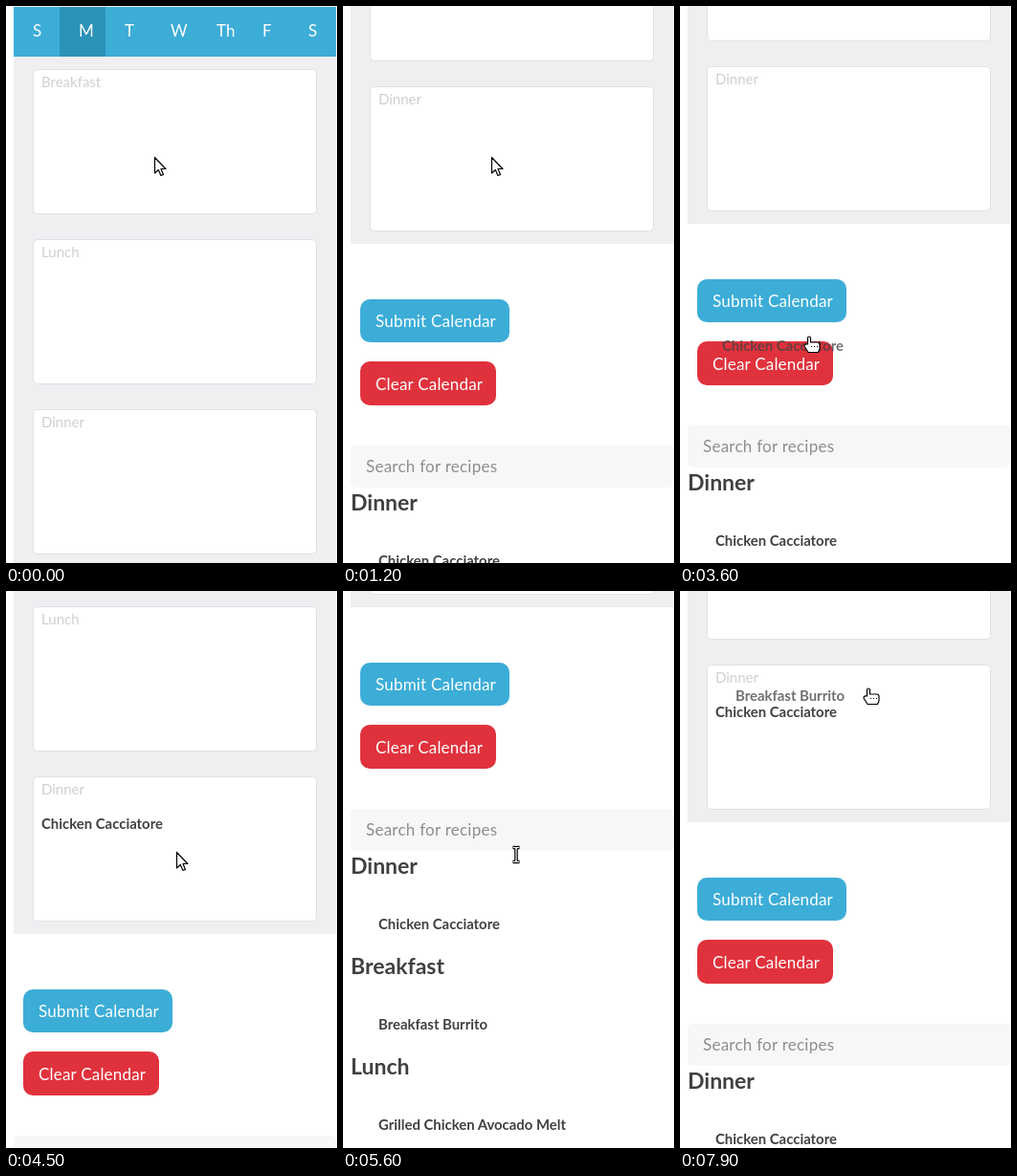
These frames come from a looping animation (346x583 px, 8000 ms). An HTML page:

```html
<!DOCTYPE html>
<html lang="en">
<head>
<meta charset="utf-8">
<title>Meal planner</title>
<style>
  html, body { margin: 0; width: 100%; height: 100%; overflow: hidden; background: #fff; }
  svg { display: block; }
  text { font-family: Lato, "Open Sans", sans-serif; }
  .day, .btn { font-size: 17px; letter-spacing: .2px; fill: #fff; }
  .search { font-size: 17px; letter-spacing: .25px; fill: #8e8e8e; }
  .meal { font-size: 15px; fill: #cdd0d3; }
  .title { font-size: 23px; font-weight: 700; fill: #404040; }
  .item { font-size: 14.9px; font-weight: 700; fill: #404040; }
  .ghost { opacity: .75; }
  .box { fill: #fff; stroke: #dfe1e4; }
  .cursor { fill: #fff; stroke: #000; stroke-width: 1.2; stroke-linejoin: round; }
</style>
</head>
<body>
<svg width="346" height="583">
  <g id="page"></g>
  <text id="ghost" class="item ghost"></text>
  <g id="cursor" class="cursor">
    <path id="arrow" d="M.5 .5V17L4.3 13.5 7 19.5 9.5 18.5 7 12.5H12Z"/>
    <g id="hand">
      <path d="M-1.5 8V1.5a1.5 1.5 0 0 1 3 0V6H8.5a2.5 2.5 0 0 1 2.5 2.5V13L9.5 16.5H-1L-4.8 10.5Q-5.5 8 -3 7.8Z"/>
      <path d="M2 10.5H9" stroke-dasharray="1 2"/>
    </g>
    <g id="beam" fill="none">
      <path stroke-width="3.6" d="M-.5-4.5h2.5l1 1 1-1h2.5M-.5 10.5h2.5l1-1 1 1h2.5M3-3.5V9.5"/>
      <path stroke="#fff" d="M0-4.5h2l1 1 1-1h2M0 10.5h2l1-1 1 1h2M3-3.5V9.5"/>
    </g>
  </g>
</svg>
<script>
const LOOP = 8000, STEP = 100;
const NOTCH = 114, GLIDE = 430;   // wheel: pixels and duration per notch
const LAG = 30, GRIP = 12;        // dragged item: delay and baseline offset
const BLUE = '#3cadd7', LEFT = 37;

const $ = id => document.getElementById(id);
const clamp = p => Math.min(1, Math.max(0, p));
const easeOut = p => 1 - (1 - p) ** 3;
const within = (t, a, b) => t >= a && t < b;

const rect = (x, y, w, h, fill, r = 0) =>
  `<rect x="${x}" y="${y}" width="${w}" height="${h}" rx="${r}" fill="${fill}"/>`;
const label = (cls, x, y, s, id = '') =>
  `<text class="${cls}" x="${x}" y="${y}" id="${id}">${s}</text>`;

const days = ['S', 'M', 'T', 'W', 'Th', 'F', 'S'];
const meals = ['Breakfast', 'Lunch', 'Dinner'];
const recipes = [
  ['Dinner', 'Chicken Cacciatore'],
  ['Breakfast', 'Breakfast Burrito'],
  ['Lunch', 'Grilled Chicken Avocado Melt']
];

// Page layout in document coordinates
$('page').innerHTML =
  rect(8, 0, 337, 587, '#eeeff1') +
  rect(8, 1, 337, 52, BLUE) +
  rect(56, 1, 48, 52, '#2b92b8') +
  days.map((d, i) => label('day', 28 + 48 * i, 32, d)).join('') +
  meals.map((m, i) =>
    `<rect class="box" x="28.5" y="${66.5 + 178 * i}" width="296" height="151" rx="4"/>` +
    label('meal', LEFT, 85 + 178 * i, m)).join('') +
  label('item', LEFT, 477, recipes[0][1], 'dropped') +
  rect(18, 645, 156, 45, BLUE, 10) + label('btn', 34, 674, 'Submit Calendar') +
  rect(18, 710, 142, 46, '#e0323d', 10) + label('btn', 34, 740, 'Clear Calendar') +
  rect(8, 798, 337, 44, '#f7f7f7', 5) + label('search', 24, 826, 'Search for recipes') +
  recipes.map(([title, item], i) =>
    label('title', 8, 866 + 105 * i, title) + label('item', LEFT, 924 + 105 * i, item)).join('');

// Each burst of wheel notches glides with an ease-out
const bursts = [
  { start: 330, count: 4, gap: 290, dir: 1 },
  { start: 3400, count: 2, gap: 290, dir: -1 },
  { start: 4930, count: 3, gap: 100, dir: 1 },
  { start: 7310, count: 2, gap: 290, dir: -1 }
];

function scrollAt(t) {
  let y = 0;
  for (const { start, count, gap, dir } of bursts)
    for (let i = 0; i < count; i++)
      y += dir * NOTCH * easeOut(clamp((t - start - i * gap) / GLIDE));
  return Math.round(y);
}

// Straight pointer moves, each from wherever the last one ended
const home = [155, 158];
const moves = [
  { from: 1600, to: 2100, at: [163, 419] },
  { from: 2100, to: 2600, at: [128, 453] },
  { from: 2700, to: 4300, at: [140, 262] },
  { from: 4400, to: 4500, at: [178, 273] },
  { from: 5600, to: 5800, at: [146, 391] },
  { from: 5800, to: 6300, at: [176, 453] },
  { from: 6400, to: 7200, at: [189, 133] },
  { from: 7200, to: 7900, at: [197, 102] }
];

const pointerAt = t => moves.reduce((pos, { from, to, at }) => {
  const p = clamp((t - from) / (to - from));
  return pos.map((v, i) => v + (at[i] - v) * p);
}, home).map(Math.round);

const drags = [
  { from: 2800, to: 4500, name: recipes[0][1] },
  { from: 6500, to: LOOP, name: recipes[1][1] }
];

function cursorAt(t) {
  if (within(t, 2400, 4500) || t >= 6100) return 'hand';
  return within(t, 5400, 5700) ? 'beam' : 'arrow';
}

const show = (id, on) => $(id).style.display = on ? '' : 'none';

function draw(now) {
  const t = Math.floor(now % LOOP / STEP) * STEP;
  $('page').setAttribute('transform', `translate(0 ${-scrollAt(t)})`);
  show('dropped', t >= drags[0].to);

  const drag = drags.find(d => within(t, d.from, d.to));
  show('ghost', drag);
  if (drag) {
    const [x, y] = pointerAt(t - LAG), [grabX] = pointerAt(drag.from - STEP);
    $('ghost').textContent = drag.name;
    $('ghost').setAttribute('x', x - grabX + LEFT);
    $('ghost').setAttribute('y', y + GRIP);
  }

  $('cursor').setAttribute('transform', `translate(${pointerAt(t)})`);
  for (const id of ['arrow', 'hand', 'beam']) show(id, id === cursorAt(t));
  requestAnimationFrame(draw);
}
draw(0);
</script>
</body>
</html>
```
